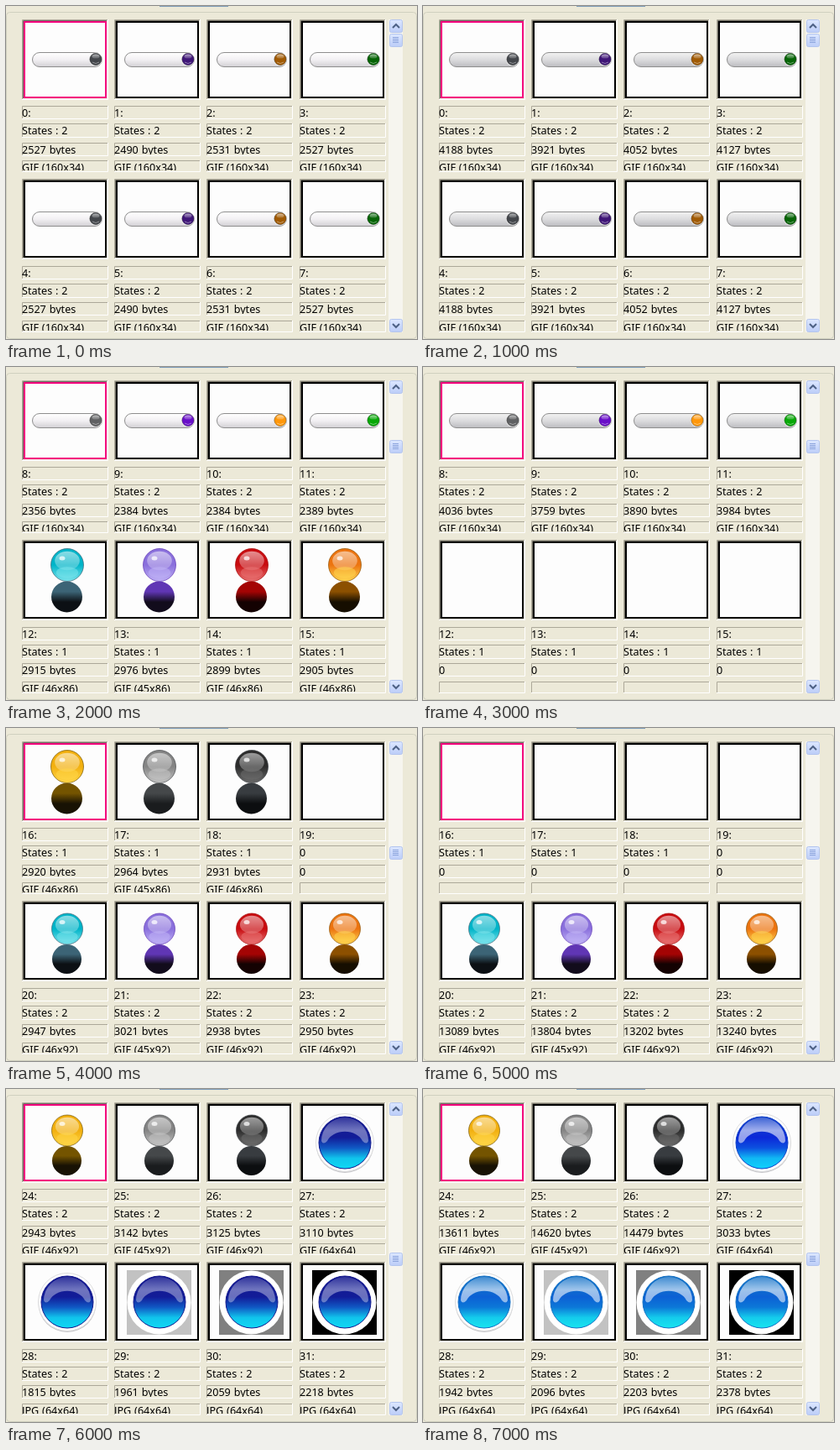
These frames come from a looping animation (490 px wide and 397 px high, 8 s). An HTML page:

```html
<!DOCTYPE html>
<html lang="en">
<head>
<meta charset="utf-8">
<style>
  html, body { margin: 0; width: 100%; height: 100%; overflow: hidden; background: #ece9d8; }
  svg { display: block; }
  text { font: 12.6px "Noto Sans", "Open Sans", sans-serif; word-spacing: .6px; }
</style>
</head>
<body>
<svg id="stage" width="490" height="397"></svg>
<script>
const stage = document.getElementById('stage');
const columns = [19, 129, 239, 350];
const labelTops = [[119, 140, 163, 184], [310, 331, 353, 375]];
const labelHeights = [16, 17, 16, 14];
const sizes = [
  [2527, 2490, 2531, 2527, 2527, 2490, 2531, 2527],
  [4188, 3921, 4052, 4127, 4188, 3921, 4052, 4127],
  [2356, 2384, 2384, 2389, 2915, 2976, 2899, 2905],
  [4036, 3759, 3890, 3984, 0, 0, 0, 0],
  [2920, 2964, 2931, 0, 2947, 3021, 2938, 2950],
  [0, 0, 0, 0, 13089, 13804, 13202, 13240],
  [2943, 3142, 3125, 3110, 1815, 1961, 2059, 2218],
  [13611, 14620, 14479, 3033, 1942, 2096, 2203, 2378]
];
const dimLeds = ['#43464b', '#3f1677', '#a05a04', '#066406'];
const litLeds = ['#606163', '#690fc8', '#ff970a', '#08a808'];
// edge, glow, top and bottom of the reflection
const orbs = {
  cyan: ['#00b4c8', '#7ce4ec', '#3c6476', '#0c1014'],
  purple: ['#8a70dc', '#c0b2f6', '#6036b4', '#120c1c'],
  red: ['#c80c10', '#e87474', '#a40404', '#140202'],
  orange: ['#ec7410', '#ffd850', '#8c5000', '#160e00'],
  yellow: ['#f2b010', '#ffd648', '#745400', '#181204'],
  silver: ['#848484', '#c4c4c4', '#45484a', '#1a1c1e'],
  black: ['#2c2c2c', '#6c6c6c', '#383c40', '#0c0e10']
};
const colourful = ['cyan', 'purple', 'red', 'orange'];
const plain = ['yellow', 'silver', 'black'];

let gradients;
function gradient(...stops) {
  const id = 'g' + gradients.length;
  const list = stops.map((c, i) => `<stop offset="${i / (stops.length - 1)}" stop-color="${c}"/>`);
  gradients.push(`<linearGradient id="${id}" x2="0" y2="1">${list.join('')}</linearGradient>`);
  return `url(#${id})`;
}
const rect = (x, y, w, h, fill, more = '') =>
  `<rect x="${x}" y="${y}" width="${w}" height="${h}" fill="${fill}" ${more}/>`;
const circle = (x, y, r, fill, more = '') =>
  `<circle cx="${x}" cy="${y}" r="${r}" fill="${fill}" ${more}/>`;
const ellipse = (x, y, rx, ry, fill) =>
  `<ellipse cx="${x}" cy="${y}" rx="${rx}" ry="${ry}" fill="${fill}"/>`;
const line = (d, colour, width = 1) =>
  `<path d="${d}" fill="none" stroke="${colour}" stroke-width="${width}"/>`;

function sunken(x, y, w, h, dark = '#aca899', light = '#fff') {
  return line(`M${x + .5} ${y + h}V${y + .5}H${x + w}`, dark) +
    line(`M${x} ${y + h - .5}H${x + w - .5}V${y}`, light);
}

function label(x, y, h, text) {
  return sunken(x, y, 103, h) +
    `<svg x="${x}" y="${y}" width="102" height="${h - 2}"><text y="13">${text}</text></svg>`;
}

function bar(x, y, led, pressed) {
  const body = pressed ? gradient('#f2f2f2', '#dcdcde', '#bcbcc0') : gradient('#fff', '#f2f0f3', '#d2d0d4');
  return rect(x + 12.5, y + 55.5, 83, 17, body, 'rx="8.5" stroke="#8e8e8e"') +
    circle(x + 88, y + 63.5, 8, '#fff') +
    circle(x + 88, y + 63.5, 7.2, led, 'stroke="#333" stroke-opacity=".45"') +
    ellipse(x + 88, y + 60, 4.5, 2.6, gradient('#fff9', '#fff2')) +
    line(`M${x + 84} ${y + 67}q4 3 8 0`, '#fff6');
}

function orb(x, y, [edge, glow, top, bottom], large) {
  const cx = x + 54, r = large ? 20 : 19, cy = y + (large ? 46 : 49.5);
  const low = large ? 18.5 : 17.5, lowY = y + (large ? 84 : 85.5);
  return circle(cx - .5, lowY, low, gradient(top, top, bottom, bottom)) +
    circle(cx, cy, r - .5, gradient(edge, edge, glow), `stroke="${top}" stroke-opacity=".7"`) +
    ellipse(cx, cy - 5, r * .74, r * .56, gradient('#fff8', '#fff3')) +
    ellipse(cx, cy + 9, r * .66, r * .34, glow + '88') +
    ellipse(cx - 6, cy - 8, 3.5, 2.5, '#fffb');
}

function disc(x, y, colours, backdrop, gloss) {
  const cx = x + 54, cy = y + 64;
  const ring = backdrop
    ? rect(x + 15, y + 26, 77, 77, backdrop) + circle(cx - .5, cy + .5, 38, '#fff')
    : circle(cx, cy + 1.5, 34.5, '#c6c6ca') + circle(cx, cy, 34.5, '#fff', 'stroke="#ddd"');
  const arch = `M${cx - 28} ${cy - 2}A28 28 0 0 1 ${cx + 28} ${cy - 2}q-2 5 -7 0A22 16 0 0 0 ${cx - 21} ${cy - 2}q-5 5 -7 0Z`;
  return ring + circle(cx, cy, 31, gradient(...colours), `stroke="${colours[0]}"`) +
    `<path d="${arch}" fill="${gradient('#fff3', '#fff9', '#fff8')}" opacity="${gloss}"/>`;
}

function picture(index, state, x, y) {
  const column = index % 4;
  if (index < 12) return bar(x, y, (index < 8 ? dimLeds : litLeds)[column], state);
  if (index < 16) return orb(x, y, orbs[colourful[column]], true);
  if (index < 19) return orb(x, y, orbs[plain[column]], true);
  if (index < 24) return orb(x, y, orbs[colourful[column]], false);
  if (index < 27) return orb(x, y, orbs[plain[column]], false);
  let colours = ['#12168c', '#141c94', '#121c98', '#1058c4', '#10c4ec', '#10d8f4'];
  if (state) colours = index == 27
    ? ['#1040c8', '#1038d0', '#0c28d8', '#0c50e0', '#10b8f4', '#10d0fc']
    : ['#1470c4', '#1070cc', '#0c60d4', '#0c78d8', '#14ccec', '#18e4f0'];
  const backdrop = index > 28 && ['#c2c2c2', '#808080', '#000'][column - 1];
  return disc(x, y, colours, backdrop, state ? 1.0 : .65);
}

function tile(page, slot) {
  const index = (page >> 1) * 8 + slot, size = sizes[page][slot];
  const x = columns[slot % 4], row = slot >> 2, y = row * 190;
  const states = index == 19 ? '0' : 'States : ' + (index > 11 && index < 19 ? 1 : 2);
  const dims = index < 12 ? '160x34' : index > 26 ? '64x64'
    : (index % 4 == 1 ? 45 : 46) + (index < 20 ? 'x86' : 'x92');
  const format = `${index > 27 ? 'JPG' : 'GIF'} (${dims})`;
  const lines = [index + ':', states, size ? size + ' bytes' : '0', size ? format : ''];
  return sunken(x, y + 16, 103, 96) +
    sunken(x + 1, y + 17, 101, 94, '#716f64', '#f1efe2') +
    rect(x + 3, y + 19, 97, 90, '#fdfdfd', `stroke="${slot ? '#000' : '#f4067e'}" stroke-width="2"`) +
    (size ? picture(index, page & 1, x, y) : '') +
    lines.map((text, i) => label(x, labelTops[row][i], labelHeights[i], text)).join('');
}

function button(y, detail) {
  return rect(457.5, y + .5, 15, 15, gradient('#dce7ff', '#bccdf8'), 'rx="2" stroke="#b4c5ee"') + detail;
}

function scrollbar(group) {
  const thumb = 33 + 54 * group;
  const grip = [5, 7, 9, 11].map(d => line(`M461 ${thumb + d - .5}h7`, '#8ca4dc')).join('');
  return rect(456, 16, 17, 373, '#f6f5ef') +
    button(16, line('M461 26l4-4 4 4', '#4d6185', 2)) +
    button(373, line('M461 379l4 4 4-4', '#4d6185', 2)) +
    button(thumb, grip);
}

function render(page) {
  gradients = [];
  const body = rect(.5, 7.5, 489, 389, '#ece9d8', 'rx="4" stroke="#d0d0bf"') +
    rect(183, 0, 82, 1, '#7f9db9') +
    sizes[page].map((_, slot) => tile(page, slot)).join('') +
    scrollbar(page >> 1);
  stage.innerHTML = `<defs>${gradients.join('')}</defs>${body}`;
}

const start = performance.now();
let shown = -1;
function tick() {
  const page = Math.floor((performance.now() - start) / 1000) % sizes.length;
  if (page != shown) render(shown = page);
  requestAnimationFrame(tick);
}
tick();
</script>
</body>
</html>
```
